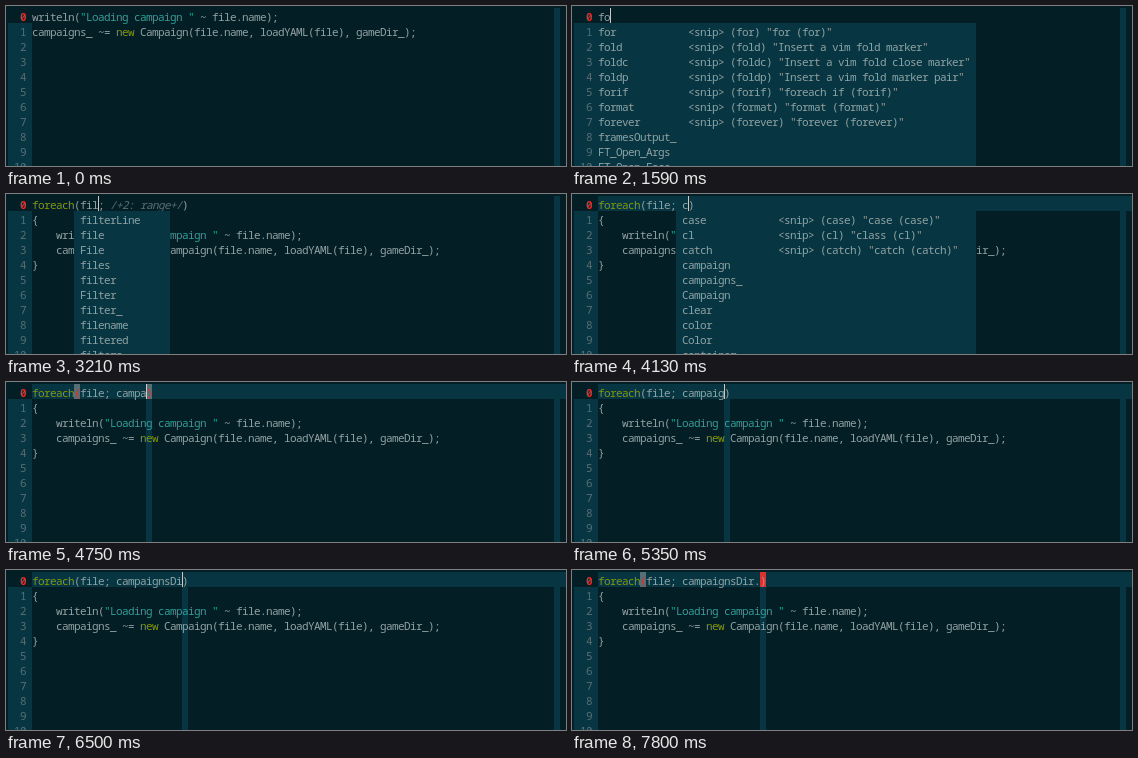
Animation, 560 px wide and 160 px high, one loop 8 s. Source, as an HTML page:

```html
<!DOCTYPE html>
<html lang="en">
<head>
<meta charset="utf-8">
<title>Snippet editing</title>
<style>
  html, body { margin: 0; width: 560px; height: 160px; overflow: hidden; background: #041e25; }
  #stage { position: relative; width: 560px; height: 160px; overflow: hidden;
    font: 11px/17px "Noto Sans Mono", "DejaVu Sans Mono", monospace; letter-spacing: -.6px;
    color: #93a1a1; font-variant-ligatures: none; }
  #stage div { position: absolute; white-space: pre; }
  .band { background: #073642; }
  .num { color: #586e75; }
  .now { background: #041e25; color: #dc322f; font-weight: bold; }
  .sel { background: #586e75; color: #041e25; }
  .sel span { color: inherit; }
  .str { color: #2aa198; }
  .key { color: #859900; }
  .rem { color: #586e75; font-style: italic; }
  .match { background: #586e75; color: #dc322f; font-weight: bold; }
  .hot { background: #dc322f; color: #93a1a1; }
  .bar { background: #c3cccc; }
  .block { background: #93a1a1; color: #041e25; }
</style>
</head>
<body>
<div id="stage"></div>
<script>
const LOOP = 8000, CW = 6, LH = 15, LEFT = 26, TOP = 2;
const stage = document.getElementById('stage');
const colX = c => LEFT + c * CW;
const rowY = r => TOP + r * LH;

const body = [
  'writeln("Loading campaign " ~ file.name);',
  'campaigns_ ~= new Campaign(file.name, loadYAML(file), gameDir_);'
];
const loop = head => [head, '{', ...body.map(s => '    ' + s), '}'];
const first = s => loop(`foreach(${s}; /+2: range+/)`);
const second = s => loop(`foreach(file; ${s})`);

// Completion menus: text column, right edge, entries
const menu = (col, right, list, tab = 0) => ({
  col, right,
  rows: list.split(',').map(s => {
    const [word, note] = s.split('|');
    return note ? `${word.padEnd(tab)}<snip> (${word}) "${note}"` : word;
  })
});
const fo = menu(0, 404, 'for|for (for),fold|Insert a vim fold marker,foldc|Insert a vim fold close marker,' +
  'foldp|Insert a vim fold marker pair,forif|foreach if (forif),format|format (format),' +
  'forever|forever (forever),framesOutput_,FT_Open_Args,FT_Open_Face', 15);
const fore = menu(0, 344, 'forever|forever (forever),foreach_reverse,foreach,Foreachable,forestGreen,' +
  'FontRenderer,forceLoad,fromStream,fieldSource,FT_LOAD_TARGET', 16);
const fi = menu(8, 416, 'fini|final class (fini),file,File,files,filter,Filter,filterLine,filename,fileName_,fieldSource', 16);
const fil = menu(8, 164, 'filterLine,file,File,files,filter,Filter,filter_,filename,filtered,filters');
const file = menu(8, 182, 'file,File,files,filename,fileName_,filesystem,fileExists,fileFromName,fileLoader,filter');
const c = menu(14, 404, 'case|case (case),cl|class (cl),catch|catch (catch),campaign,campaigns_,' +
  'Campaign,clear,color,Color,container', 16);
const names = 'CampaignGUI,CampaignsGUI,campaignGUI_,campaignsGUI_,CampaignManager,campaignManager,' +
  'campaignManager_,campaignProgress,CampaignInitException,campaign';
const camp = menu(14, 242, names);
const ca = menu(14, 242, 'campaigns_,Campaign,campaign,' + names);
const plural = menu(14, 242, 'CampaignsGUI,campaignsGUI_,campaigns_,campaignsDir,campaigns,' + names);
const dir = menu(14, 200, 'campaignsDir,campaignsDir_');

const steps = [];
const at = (t, state) => steps.push({ t, ...state });
const type = (t, lines, col, popup, extra) => at(t, { lines, col, popup, ...extra });

at(0, { lines: body });
at(100, { lines: body, block: 0 });
at(470, { lines: body, sel: 1 });
at(650, { lines: body, sel: 2 });
type(920, [''], 0);
type(1380, ['f'], 1);
type(1420, ['f'], 1, fo);
type(1550, ['fo'], 2);
type(1590, ['fo'], 2, fo);
type(1730, ['for'], 3);
type(1770, ['for'], 3, fo);
type(1910, ['fore'], 4);
type(1950, ['fore'], 4, fore);
type(2210, ['fore'], 4);
at(2250, { lines: first('/+1: element+/'), mark: [8, 14] });
type(2820, first('f'), 9);
type(2860, first('f'), 9, fi);
type(2990, first('fi'), 10);
type(3030, first('fi'), 10, fi);
type(3170, first('fil'), 11, fi);
type(3210, first('fil'), 11, fil);
type(3570, first('file'), 12);
type(3610, first('file'), 12, file);
type(3900, first('file'), 12);
at(3940, { lines: second('/+2: range+/'), mark: [14, 12] });

// Each key closes the menu for a moment, then it opens again
const range = (t, s, popup, open = 40, pair = true) => {
  const col = 14 + s.length, line = { cross: true };
  type(t, second(s), col, null, { ...line, pair });
  if (popup) type(t + open, second(s), col, popup, line);
};
range(4050, 'c', c, 80);
range(4280, 'ca', ca, 80);
range(4590, 'cam', camp);
range(4670, 'camp', camp);
range(4750, 'campa', camp);
range(4870, 'campai', camp);
range(5350, 'campaig', camp, 80, false);
range(5590, 'campaign', camp, 90);
range(5860, 'campaigns', plural, 80, false);
range(6320, 'campaignsD', dir, 80, false);
range(6460, 'campaignsDi', dir, 80, false);
range(6700, 'campaignsDir', dir, 80, false);
range(7760, 'campaignsDir.');
steps[steps.length - 1].hot = true;

function box(cls, x, y, w, h, text = '') {
  const el = document.createElement('div');
  el.className = cls;
  el.style.cssText = `left:${x}px;top:${y}px;width:${w}px;height:${h}px`;
  el.textContent = text;
  stage.append(el);
  return el;
}
const cell = (cls, col, text) => box(cls, colX(col), TOP, text.length * CW, LH, text);

function code(text, row, selected) {
  const el = box(selected ? 'sel' : '', LEFT, rowY(row), text.length * CW, LH);
  for (const part of text.split(/("[^"]*"|\/\+.*?\+\/|\b(?:new|foreach)\b)/)) {
    const span = document.createElement('span');
    span.className = part[0] === '"' ? 'str' : part.startsWith('/+') ? 'rem' :
      /^(new|foreach)$/.test(part) ? 'key' : '';
    span.textContent = part;
    el.append(span);
  }
}

function draw(s) {
  stage.replaceChildren();
  box('band', 2, TOP, 24, 158);
  box('band', 548, TOP, 6, 158);
  if (s.cross) {
    box('band', LEFT, TOP, 534, LH);
    box('band', colX(s.col), TOP, CW, 158);
  }
  const current = s.sel === 2 ? 1 : 0;
  for (let r = 0; r <= 10; r++) {
    const n = Math.abs(r - current);
    box(n ? 'num' : 'num now', 2, rowY(r), 24, LH, String(n).padStart(3));
  }
  s.lines.forEach((text, r) => code(text, r, r < s.sel));
  if (s.mark) cell('sel', s.mark[0], s.lines[0].substr(...s.mark));
  if (s.block >= 0) cell('block', s.block, s.lines[0][s.block]);
  if (s.pair) {
    cell('match', 7, '(');
    cell(s.hot ? 'hot' : 'match', s.col, ')');
  }
  if (s.popup) {
    const x = colX(s.popup.col), left = Math.max(LEFT, x - CW);
    box('band', left, rowY(1), s.popup.right - left, 143);
    s.popup.rows.slice(0, 10).forEach((text, i) => box('', x, rowY(i + 1), text.length * CW, LH, text));
  }
  if (s.col >= 0 && !s.hot) box('bar', colX(s.col), TOP, 1, LH);
}

let shown;
const start = performance.now();
function tick() {
  const t = (performance.now() - start) % LOOP;
  const state = steps.findLast(s => s.t <= t) || steps[0];
  if (state !== shown) draw(shown = state);
  requestAnimationFrame(tick);
}
tick();
</script>
</body>
</html>
```
